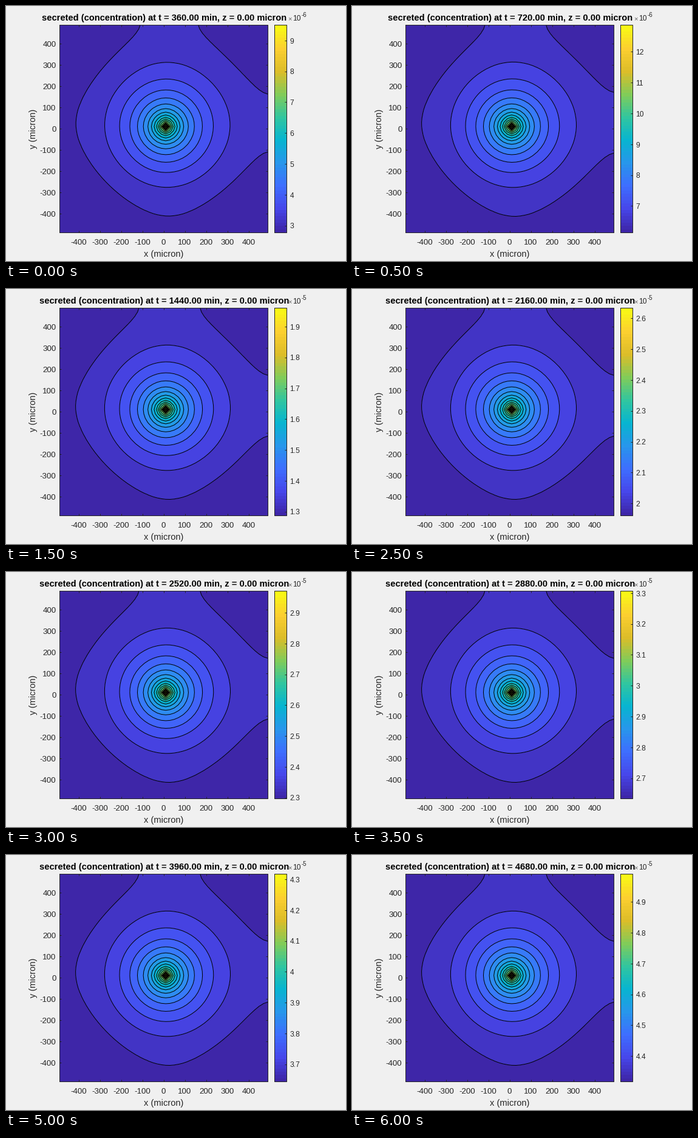
Animation, 560 px wide and 420 px high, one loop 6.5 s. Source, as a matplotlib script:

```python
import numpy as np
import matplotlib.pyplot as plt
from matplotlib.animation import FuncAnimation
from matplotlib.colors import LinearSegmentedColormap

W, H, DPI = 560, 420, 100
FRAMES, INTERVAL = 13, 500
plt.rcParams["font.family"] = "Liberation Sans"

# Plot box and colour bar, in pixels with y pointing down
LEFT, RIGHT, TOP, BOTTOM = 88, 431, 31, 373
BAR_LEFT, BAR_RIGHT = 442, 462
TICK = 3.4
INK = (0.15, 0.15, 0.15)
PAPER = (240 / 255,) * 3

STOPS = ["#3E26A8", "#4747EB", "#3E6FFF", "#2797EB", "#08B5D0",
         "#31C69F", "#81CC59", "#DCBD29", "#FCCF30", "#F9FB15"]
PARULA = LinearSegmentedColormap.from_list("parula", STOPS, N=64)

# Diffusion from one secreting voxel in a closed square
N, STEP, SOURCE = 50, 20, 25
DT, DIFFUSION = 0.01, 1000
SECRETION = 7.5e-5 * 2494 / 8000
LEVELS = 20
EDGE = STEP * (N - 1) / 2

modes = np.arange(N)
basis = np.cos(np.pi * np.outer(modes, np.arange(N) + 0.5) / N)
basis *= np.sqrt(np.where(modes == 0, 1, 2) / N)[:, None]
damp = 1 / (1 + DIFFUSION * DT / STEP**2 * (2 - 2 * np.cos(np.pi * modes / N)))
decay = np.outer(damp, damp)
grid = np.linspace(-EDGE, EDGE, N)


def concentration(minutes):
    """Sum the decaying cosine modes of every secretion step so far."""
    n = round(minutes / DT)
    rest = 1 - decay
    rest[0, 0] = 1
    total = decay * (1 - decay**n) / rest
    total[0, 0] = n
    start = np.outer(basis[:, SOURCE], basis[:, SOURCE])
    field = basis.T @ (total * start) @ basis
    field[SOURCE, SOURCE] += 1
    return SECRETION * DT * field


def to_x(v):
    return LEFT + (v + EDGE) / (2 * EDGE) * (RIGHT - LEFT)


def to_y(v):
    return BOTTOM - (v + EDGE) / (2 * EDGE) * (BOTTOM - TOP)


fig = plt.figure(figsize=(W / DPI, H / DPI), dpi=DPI, facecolor=PAPER)
ax = fig.add_axes([0, 0, 1, 1])


def label(x, y, text, px, color=INK, **kw):
    ax.text(x, y, text, fontsize=px * 72 / DPI, color=color,
            va="baseline", zorder=5, **kw)


def line(xs, ys):
    ax.plot(xs, ys, color=INK, lw=0.72, zorder=4, solid_capstyle="butt")


def box(x0, x1):
    line([x0, x1, x1, x0, x0], [TOP, TOP, BOTTOM, BOTTOM, TOP])


def draw_axes():
    box(LEFT, RIGHT)
    for v in range(-400, 401, 100):
        x, y = to_x(v), to_y(v)
        line([x, x], [BOTTOM, BOTTOM - TICK])
        line([x, x], [TOP, TOP + TICK])
        line([LEFT, LEFT + TICK], [y, y])
        line([RIGHT, RIGHT - TICK], [y, y])
        label(x, 393, str(v), 13.33, ha="center")
        label(82.5, y + 5, str(v), 13.33, ha="right")
    label(259.5, 413, "x (micron)", 14.67, ha="center")
    label(48.5, 202, "y (micron)", 14.67, ha="center",
          rotation=90, rotation_mode="anchor")


def draw_bar(lo, hi, power):
    ramp = np.linspace(1, 0, 64)[:, None]
    ax.imshow(ramp, cmap=PARULA, extent=(BAR_LEFT, BAR_RIGHT, BOTTOM, TOP),
              origin="upper", aspect="auto", interpolation="nearest", zorder=1)
    box(BAR_LEFT, BAR_RIGHT)
    for n in range(int(np.ceil(lo * 1e6)), int(hi * 1e6) + 1):
        y = BOTTOM - (n * 1e-6 - lo) / (hi - lo) * (BOTTOM - TOP)
        line([BAR_RIGHT, BAR_RIGHT - TICK], [y, y])
        label(467.5, y + 4.7, f"{n * 10.0 ** (-6 - power):g}", 12)
    label(464, 24, "×", 11, "0.4")
    label(472.3, 24, "10", 12)
    label(487, 18, str(power), 9.6)


def draw(k):
    ax.clear()
    ax.set_axis_off()
    minutes = 360 * (k + 1)
    field = concentration(minutes)
    lo, peak = field.min(), field.max()
    levels = np.linspace(lo, peak, LEVELS + 2)
    xs, ys = to_x(grid), to_y(grid)

    edges = levels.copy()
    edges[0] -= 1e-9
    edges[-1] += 1e-9
    shades = [PARULA(i / LEVELS) for i in range(LEVELS + 1)]
    ax.contourf(xs, ys, field, levels=edges, colors=shades, zorder=1)
    ax.contour(xs, ys, field, levels=levels[1:-1], colors="black",
               linewidths=0.72, zorder=2)

    draw_axes()
    draw_bar(lo, levels[-2], -6 if k < 2 else -5)
    label(260.3, 24, f"secreted (concentration) at t = {minutes:.2f} min, "
          "z = 0.00 micron", 14.67, "black", ha="center", weight="bold")
    ax.set_xlim(0, W)
    ax.set_ylim(H, 0)


anim = FuncAnimation(fig, draw, frames=FRAMES, interval=INTERVAL,
                     init_func=lambda: None, repeat=True, repeat_delay=0)
plt.show()
```
